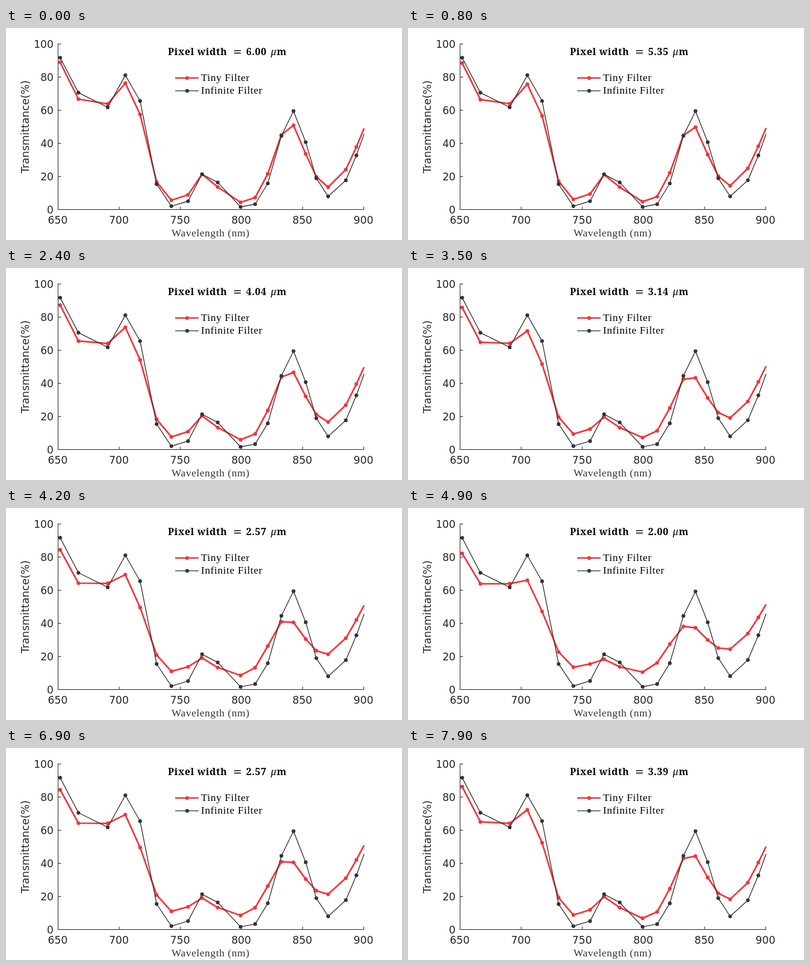
These frames come from a looping animation (658 px wide and 352 px high, 8000 ms). An HTML page:

```html
<!DOCTYPE html>
<html lang="en">
<head>
<meta charset="utf-8">
<title>Filter transmittance</title>
<style>
  html, body { margin: 0; width: 100%; height: 100%; overflow: hidden; background: #fff; }
  svg { display: block; width: 658px; height: 352px; }
  .axis { stroke: #262626; fill: none; }
  .tick, .ylabel { font: 17.2px "DejaVu Sans", sans-serif; fill: #262626; }
  .ylabel { font-size: 17.5px; text-anchor: middle; }
  .tex { font: 17.4px "Liberation Serif", serif; letter-spacing: .6px; }
  .title { font: bold 16px "Noto Serif", serif; letter-spacing: .6px; }
  .title .eq { font: 18px "DejaVu Sans", sans-serif; }
  .title .mu { font: italic 18px "Liberation Serif", serif; }
  .line { fill: none; stroke-linejoin: round; }
  .tiny .line { stroke: #f93336; stroke-width: 2.7; }
  .tiny circle { fill: #f93336; }
  .inf .line { stroke: #333; stroke-width: 1.35; }
  .inf circle { fill: #333; }
</style>
</head>
<body>
<svg viewBox="0 0 658 352">
  <g id="axes"><path class="axis" d="M86.5 26V301.5H595"/></g>
  <text class="ylabel" transform="translate(37.5 164) rotate(-90)">Transmittance(%)</text>
  <text class="tex" x="275" y="346" fill="#333">Wavelength (nm)</text>

  <g class="title">
    <text x="269" y="44.5">Pixel width</text>
    <text class="eq" x="377" y="45">=</text>
    <text id="width" x="399" y="44.5">6.00</text>
    <text class="mu" x="440" y="44.5">μ</text>
    <text x="450" y="44.5">m</text>
  </g>

  <g class="tiny"><path class="line" d="M281 83H320"/><circle cx="301" cy="83" r="3.1"/></g>
  <g class="inf"><path class="line" d="M281 104.3H320"/><circle cx="301" cy="104.3" r="3.1"/></g>
  <text class="tex" x="324" y="87.5">Tiny Filter</text>
  <text class="tex" x="324" y="109.3">Infinite Filter</text>

  <g class="tiny" id="tiny"><path class="line"/></g>
  <g class="inf" id="inf"><path class="line"/></g>
</svg>
<script>
const NS = "http://www.w3.org/2000/svg";
const $ = id => document.getElementById(id);

function add(parent, tag, attrs, text = "") {
  const el = document.createElementNS(NS, tag);
  for (const k in attrs) el.setAttribute(k, attrs[k]);
  el.textContent = text;
  return parent.appendChild(el);
}

// Axis ticks and their labels
for (let i = 0; i <= 5; i++) {
  const x = 86.5 + i * 101.6, y = 301.5 - i * 55;
  add($("axes"), "path", { class: "axis", d: `M${x} 301.5v-5M86.5 ${y}h5` });
  add($("axes"), "text", { class: "tick", x: x - .5, y: 325.3, "text-anchor": "middle" }, 650 + i * 50);
  add($("axes"), "text", { class: "tick", x: 79, y: y + 6, "text-anchor": "end" }, i * 20);
}

// Sample positions; the last one is the edge of the plot and has no marker
const xs = [90, 120.3, 169, 198.3, 222.8, 250.3, 274.8, 302.5, 325.8, 351.8, 389.8,
  414, 435, 457.6, 477.7, 498, 515.6, 535.3, 564.7, 582.2, 595];
const ideal = [49.3, 107.4, 131.7, 78.3, 121.2, 259.2, 295.8, 287.5, 242.8, 256.4, 297,
  292.5, 258, 179, 137.9, 189.5, 249.4, 279.6, 252.9, 211.6, 176];

// Curve heights at three pixel widths, blended by a parabola in 1/width
const wide = [57, 118, 126, 91.5, 143.5, 255.5, 286, 277, 242.8, 264, 289.5,
  281.5, 242, 177.5, 161.5, 209, 247, 264.2, 235, 197.5, 166.5];
const mid = [65.5, 123.3, 125, 104.6, 159.5, 247.5, 275.7, 267.4, 247.4, 265, 281.5,
  270.3, 232.4, 184.6, 182.4, 215.7, 240, 249, 221.6, 189, 163];
const narrow = [75.4, 125.8, 125.7, 120, 171.8, 239, 264.3, 259, 251.2, 263.8, 272.5,
  257, 226, 196.6, 198.8, 219, 232.5, 234.4, 208.4, 181.5, 160];
const nodes = [6, 22 / 7, 2].map(w => 1 / w);

const weights = u => nodes.map((a, i) =>
  nodes.reduce((p, b, j) => i === j ? p : p * (u - b) / (a - b), 1));

for (const id of ["tiny", "inf"])
  xs.slice(0, -1).forEach(x => add($(id), "circle", { cx: x, r: 3.1 }));

function plot(id, ys) {
  const [line, ...dots] = $(id).children;
  line.setAttribute("d", "M" + xs.map((x, i) => x + " " + ys[i].toFixed(2)).join("L"));
  dots.forEach((dot, i) => dot.setAttribute("cy", ys[i].toFixed(2)));
}

// The width shrinks in 49 steps, rests at 2, then grows again
function stepAt(n) {
  if (n < 49) return 49 - n;
  return n < 63 ? 0 : n - 62;
}

let last = -1;
function draw(now) {
  const n = Math.floor(now % 8000 / 100);
  if (n !== last) {
    last = n;
    const w = 2 + 4 * stepAt(n) / 49;
    const [a, b, c] = weights(1 / w);
    const tiny = xs.map((_, i) => a * wide[i] + b * mid[i] + c * narrow[i]);
    const pull = .04 / (w * w);
    plot("tiny", tiny);
    plot("inf", ideal.map((y, i) => y + (tiny[i] - y) * pull));
    $("width").textContent = w.toFixed(2);
  }
}

const start = performance.now();
function loop() {
  draw(performance.now() - start);
  requestAnimationFrame(loop);
}
loop();
</script>
</body>
</html>
```
